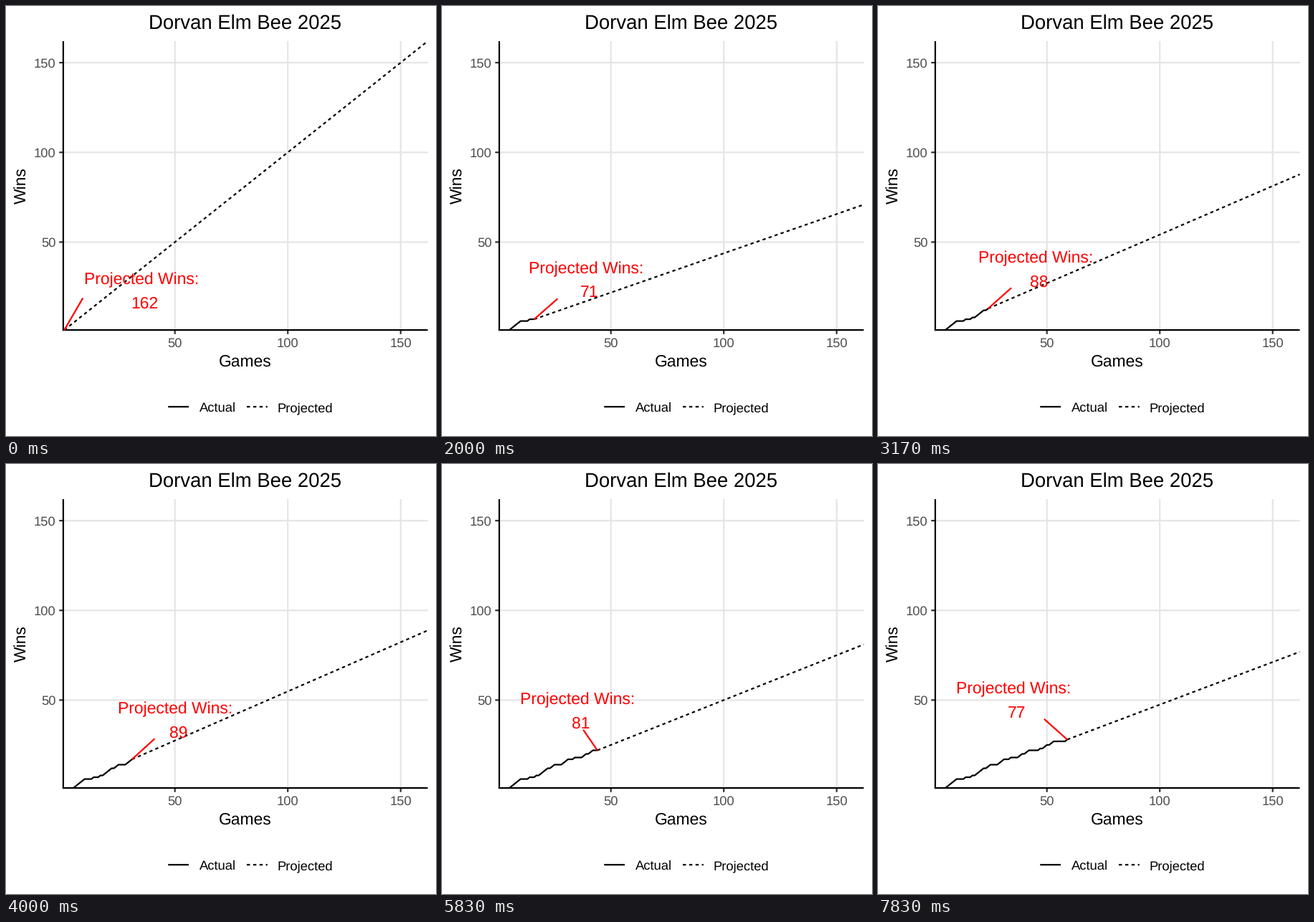
Write a matplotlib script that moves like this. It is 600 px wide and 600 px high and loops after 8 s.

```python
import numpy as np
import matplotlib.pyplot as plt
from matplotlib.animation import FuncAnimation
from matplotlib.patches import Rectangle

plt.rcParams["font.family"] = "Liberation Sans"
plt.rcParams["text.hinting"] = "none"

SIZE, DPI = 600, 100
STEPS, SUB, LOOP = 48, 5, 8000
FRAMES = STEPS * SUB
SEASON = 162
PX = 72 / DPI
LW = 2.22 * PX
LEFT, RIGHT, TOP, BOTTOM = 79.9, 588.5, 49.0, 452.1
ASPECT = (RIGHT - LEFT) / (BOTTOM - TOP)

WON = [1, 6, 7, 8, 9, 10, 14, 17, 19, 20, 21, 22, 24, 25, 29, 30, 31,
       34, 38, 39, 41, 42, 47, 49, 50, 52, 53, 59]
games = np.arange(1, 61)
wins = np.cumsum(np.isin(games, WON))

# Label: leftmost centre, and how far the point pushes it to the right
LABEL_X = 193.3
PUSH_GAME = [1, 10, 16, 18, 24, 27, 36]
PUSH_DIST = [0, 12.3, 12, 14.3, 31.2, 38, 58]
HALF_W, HALF_H, LIFT = 86, 26.7, 55.4


def px(game):
    return RIGHT - (SEASON - game) * 3.15


def py(win):
    return BOTTOM - (win - 1) * (BOTTOM - TOP) / (SEASON - 1)


fig = plt.figure(figsize=(SIZE / DPI, SIZE / DPI), dpi=DPI, facecolor="white")
ax = fig.add_axes([0, 0, 1, 1])
ax.set_xlim(0, SIZE)
ax.set_ylim(SIZE, 0)
ax.axis("off")
panel = Rectangle((LEFT, TOP), RIGHT - LEFT, BOTTOM - TOP,
                  transform=ax.transData)


def line(xs, ys, color="black", z=3, **kw):
    (ln,) = ax.plot(xs, ys, color=color, lw=LW, zorder=z, snap=False,
                    solid_capstyle="butt", dash_capstyle="butt", **kw)
    return ln


def text(x, y, s, size, color="black", ha="center", **kw):
    return ax.text(x, y, s, fontsize=size * PX, color=color, ha=ha,
                   va="baseline", **kw)


# Grid, ticks and axes
for v in (50, 100, 150):
    x, y = px(v), py(v)
    line([x, x], [TOP, BOTTOM], "#e5e5e5", 1)
    line([LEFT, RIGHT], [y, y], "#e5e5e5", 1)
    line([x, x], [BOTTOM, BOTTOM + 5.7], "#333333", 5)
    line([LEFT - 5.7, LEFT], [y, y], "#333333", 5)
    text(x, 476, str(v), 18.33, "#4d4d4d")
    text(69.4, y + 6.6, str(v), 18.33, "#4d4d4d", "right")
line([LEFT, LEFT], [TOP, BOTTOM + 1], z=6)
line([LEFT - 1, RIGHT], [BOTTOM, BOTTOM], z=6)

# Titles and legend
text(334, 32.2, "Dorvan Elm Bee 2025", 27.5)
text(334, 502.5, "Games", 22.92)
text(28, 251, "Wins", 22.92, rotation=90, rotation_mode="anchor")
DASH = (0, (2, 2))
line([226.2, 255], [559.2, 559.2])
text(269.5, 566.2, "Actual", 18.33, ha="left")
line([336, 364.8], [559.2, 559.2], linestyle=DASH)
text(378.5, 566.2, "Projected", 18.33, ha="left")

# Moving parts
actual = line([], [])
projected = line([], [], linestyle=DASH)
pointer = line([], [], "red", 7)
for ln in (actual, projected):
    ln.set_clip_path(panel)
caption = text(0, 0, "Projected Wins:", 22.92, "red", "left", zorder=8)
total = text(0, 0, "", 22.92, "red", zorder=8)


def dist(x, y):
    return np.hypot(x, y * ASPECT)


def attach(x, y, cx, cy):
    """Point on the label box where the pointer ends."""
    low = cy + HALF_H
    ex = min(max(x, cx - HALF_W), cx + HALF_W)
    d = dist(x - ex, y - low)
    to_bottom = dist(x - cx, y - low)
    to_side = dist(x - ex, y - cy)
    if ex == x or to_bottom < to_side:
        return ex + (cx - ex) * d / to_bottom, low
    return ex, low + (cy - low) * d / to_side


def update(frame):
    step = min((frame + 1) // SUB, STEPS - 1)
    g = int(round(1 + 1.23 * step))
    w = wins[g - 1]
    goal = w * SEASON / g
    x, y = px(g), py(w)

    actual.set_data(px(games[:g]), py(wins[:g]))
    projected.set_data([x, px(SEASON)], [y, py(goal)])

    cx = LABEL_X
    if x < LABEL_X:
        cx += np.interp(g, PUSH_GAME, PUSH_DIST)
    pointer.set_data(*zip((x, y), attach(x, y, cx, y - LIFT)))
    caption.set_position((cx - 84, y - 63.9))
    total.set_position((cx + 0.5, y - 30.7))
    total.set_text(f"{goal:.0f}")
    return actual, projected, pointer, caption, total


anim = FuncAnimation(fig, update, frames=FRAMES, interval=LOOP / FRAMES,
                     repeat=True, repeat_delay=0, blit=False)
plt.show()
```
